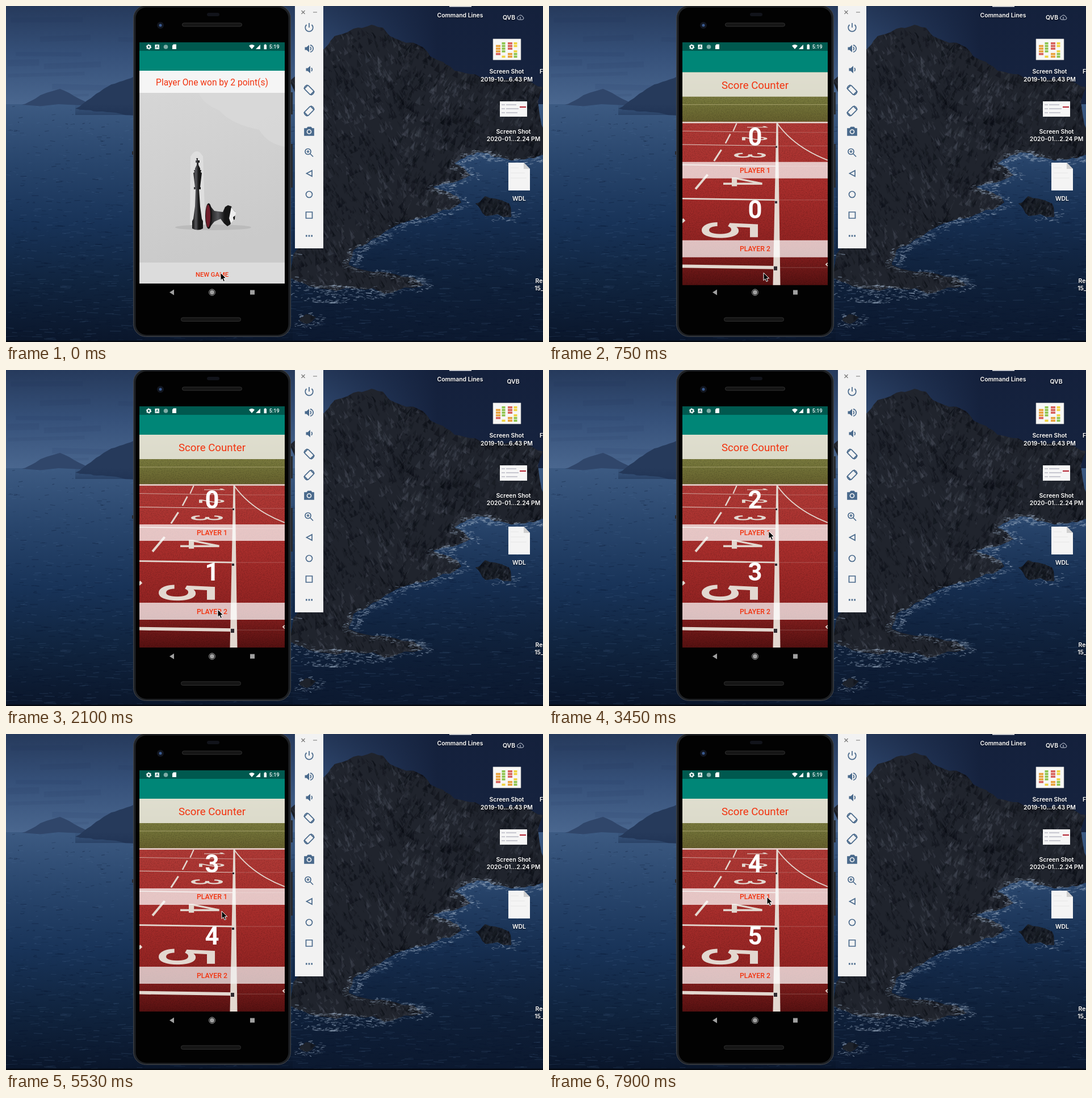
Recreate the animation shown at these times as an HTML page with a canvas. Size 946x592 px, loop 8 s.

```html
<!DOCTYPE html>
<html lang="en">
<head>
<meta charset="utf-8">
<title>Score counter</title>
<style>
html, body { margin: 0; width: 100%; height: 100%; overflow: hidden; background: #0b1a33; }
canvas, svg { position: absolute; left: 0; top: 0; width: 946px; height: 592px; }
text { text-anchor: middle; }
.app { font-family: Roboto, sans-serif; fill: #f2330f; }
.btn { font-weight: 500; font-size: 12.3px; }
.score { font-weight: 700; font-size: 43.6px; fill: #fff; }
.desk { font: 600 10.4px Inter, sans-serif; fill: #fff; filter: drop-shadow(0 1px 1px #000a); }
.chalk { fill: none; stroke: #e3d8d0; }
.lane { font: 500 10px Roboto, sans-serif; fill: #e3d8d0; stroke: none; }
</style>
</head>
<body>
<canvas id="wall" width="946" height="592"></canvas>
<svg viewBox="0 0 946 592">
<defs>
  <linearGradient id="red" x2="0" y2="1">
    <stop offset="0" stop-color="#b13b37"/><stop offset=".4" stop-color="#a92e2c"/>
    <stop offset=".75" stop-color="#922322"/><stop offset="1" stop-color="#571111"/>
  </linearGradient>
  <linearGradient id="grass" x2="0" y2="1">
    <stop offset="0" stop-color="#8f8c52"/><stop offset=".6" stop-color="#75763a"/><stop offset="1" stop-color="#66602d"/>
  </linearGradient>
  <linearGradient id="studio" x2=".25" y2="1"><stop stop-color="#d6d6d6"/><stop offset="1" stop-color="#cacaca"/></linearGradient>
  <linearGradient id="metal"><stop stop-color="#111"/><stop offset=".35" stop-color="#56565a"/><stop offset=".6" stop-color="#161616"/></linearGradient>
  <clipPath id="view"><path d="M235 64H491V492H235Z"/></clipPath>
  <clipPath id="b1"><path d="M235 272H491V301H235Z"/></clipPath>
  <clipPath id="b2"><path d="M235 410H491V440H235Z"/></clipPath>
  <filter id="grain" x="0" y="0" width="1" height="1">
    <feTurbulence type="fractalNoise" baseFrequency=".55" numOctaves="2" seed="4"/>
    <feColorMatrix values="0 0 0 0 0  0 0 0 0 0  0 0 0 0 0  0 0 0 -1.6 .95"/>
    <feComposite in2="SourceGraphic" operator="in"/>
  </filter>
</defs>

<!-- desktop icons -->
<path d="M781 0h39v1.5h-39z" fill="#eee"/>
<g id="sheet"><path d="M858 58h49v37h-49z" fill="#f7f7f5" stroke="#bbb" stroke-width=".6"/></g>
<path d="M870 168h48v27h-48z" fill="#f6f6f6"/>
<path d="M873 174h6m2 0h18M873 181h6m2 0h22M873 188h6m2 0h20" stroke="#99a"/>
<path d="M905 177h11v2h-11z" fill="#b21f2d"/>
<path d="M885 276h27l11 11v38h-38z" fill="#f4f4f4"/><path d="M912 276v11h11z" fill="#cfcfcf"/>
<path d="M889 285h14m-14 9h25m-25 9h28" stroke="#e6e6e6"/>
<g class="desk">
  <text x="800" y="20">Command Lines</text>
  <text id="folder" y="24">QVB</text>
  <text x="882" y="119">Screen Shot</text><text x="882" y="132.500">2019-10...6.43 PM</text>
  <text x="894" y="224.500">Screen Shot</text><text x="894" y="237.500">2020-01...2.24 PM</text>
  <text x="904" y="343">WDL</text>
  <text x="943" y="119">F</text><text x="939" y="488">Re</text><text x="939" y="501">15_</text>
</g>
<path id="cloud" d="M903 24h6.500a2.600 2.600 0 0 0 .5-5.100a3.800 3.800 0 0 0-7-.8a3 3 0 0 0 0 5.900zM906 19v4" fill="none" stroke="#cfd6e2"/>

<!-- emulator toolbar -->
<path d="M509 0h50v427h-50z" fill="#f2f2f2"/>
<path d="M520.500 8l6 6m0-6l-6 6M541 11h7" stroke="#777" stroke-width="1.200"/>
<g fill="none" stroke="#4a6a8c" stroke-width="1.700">
  <path d="M534 30v8M529.500 33a6.800 6.800 0 1 0 9 0"/>
  <path id="horn" d="M526.500 72.500h3l4.500-4v13l-4.500-4h-3z" fill="#4a6a8c" stroke="none"/>
  <path d="M536 72q2.500 3 0 6M536 68.800a6.300 6.300 0 0 1 0 12.400"/>
  <use href="#horn" x="2" y="37"/><path d="M538 109q2.500 3 0 6"/>
  <g id="turn" transform="translate(534 148)">
    <rect x="-4.500" y="-7.500" width="9" height="15" rx="1" transform="rotate(-45)"/>
    <path d="M-9 -2a9 9 0 0 1 6 -7M9 2a9 9 0 0 1 -6 7"/>
  </g>
  <use href="#turn" transform="matrix(-1 0 0 1 1068 37)"/>
  <path d="M526 216h4l2-2.500h5l2 2.500h3v12h-16z" fill="#4a6a8c"/><circle cx="534" cy="221.500" r="3.500" stroke="#f2f2f2"/>
  <circle cx="532" cy="256.500" r="5"/><path d="M536 260.500l5 5M529.500 256.500h5M532 254v5"/>
  <path d="M539 290v10l-9.500-5z"/><circle cx="534" cy="332" r="5.500"/><path d="M528.500 363h11v11h-11z"/>
  <path d="M528 405h13" stroke-width="2.800" stroke-dasharray="2.600 2.100"/>
</g>

<!-- phone -->
<path d="M501 152h4v39h-4zM501 243h4v77h-4zM222 256h3v6h-3z" fill="#25282d"/>
<rect x="224.500" y="-1" width="277" height="583.500" rx="22" fill="#1e2125" stroke="#43464c"/>
<rect x="228.500" y="2.500" width="269" height="577" rx="19" fill="#020202"/>
<rect x="354" y="12" width="22" height="6" rx="3" fill="#11131a"/>
<circle cx="272" cy="34" r="6" fill="#12161f"/><circle cx="272" cy="34" r="2.500" fill="#3a5a90"/>
<g fill="#151515" stroke="#303030"><rect x="310.500" y="30" width="105" height="6" rx="3"/><rect x="308.500" y="549" width="105" height="6.500" rx="3"/></g>
<g fill="#a0a0a0"><path d="M296 499.500v10l-8-5zM430 500.500h8v8h-8z"/><circle cx="363" cy="504.500" r="4"/>
<circle cx="363" cy="504.500" r="5.500" fill="none" stroke="#a0a0a0"/></g>

<g clip-path="url(#view)">
  <path d="M235 64h256v425h-256z" fill="#cfcfcf"/>
  <path d="M235 79h256v40h-256z" fill="#008677"/>

  <g id="win">
    <path d="M235 114h256v39h-256z" fill="#f5f5f5"/>
    <path d="M235 153h256v299h-256z" fill="url(#studio)"/>
    <path d="M340 153h151v95q-30-5-45-30q-50-10-70-34q-30-12-36-31z" fill="#dadada" opacity=".75"/>
    <path d="M325 265q11-18 22 0l4 126h-27z" fill="#dedede"/>
    <ellipse cx="365" cy="390" rx="67" ry="5" fill="#bbb"/>
    <g fill="url(#metal)">
      <path d="M335 268h3v4h3v4h-2v4l3 6v3h2l-1 4 2 1-3 25h1v4h-3l2 30 3 22 2 4v13q-9 5-19 0v-13l2-4 3-22 1-30h-3v-4h2l-3-25 2-1-1-4h2v-3l3-6v-4h-2v-4h2z"/>
      <path d="M357 349l10 12 15 2 4-9 5-3 6 2 3 6 4 4-1 13-5 2-3 7-5 3-6-5-6-8-11 5-10 12z"/>
    </g>
    <path d="M397 354l4 6 4 4-1 5-4 3 1 5-5 6-3-9 2-10z" fill="#eee"/>
    <ellipse cx="357" cy="370" rx="6" ry="22.500" fill="#171314"/><ellipse cx="356" cy="370" rx="4" ry="20" fill="#701e2b"/>
    <path d="M235 452h256v37h-256z" fill="#dcdcdc"/>
    <text class="app" x="363" y="140" font-size="15.600">Player One won by 2 point(s)</text>
    <text class="app" x="363" y="476.500" font-size="11.200" font-weight="500">NEW GAME</text>
  </g>

  <g id="game">
    <path d="M235 114h256v88h-256z" fill="url(#grass)"/>
    <path d="M235 201h256v288h-256z" fill="url(#red)"/>
    <path d="M235 157h256v332h-256z" filter="url(#grain)" opacity=".25"/>
    <path d="M235 171h256" stroke="#a5a06c"/>
    <g class="chalk" id="track">
      <path d="M235 202.500h256" stroke-width="2.500"/>
      <path d="M402 204q30 42 89 65M491 450l-3 2.500 3 3" stroke-width="1.800"/>
      <path d="M400.500 202h3l4 287h-13z" fill="#e3d8d0" stroke="none"/>
    </g>
    <path d="M396 456h6v7h-6zM398 341h4v4h-4zM399 244h3v3h-3z" fill="#302a30"/>
    <path d="M235 114h256v43h-256z" fill="#f4f3ee" opacity=".8"/>
    <path d="M235 272h256v29h-256zM235 410h256v30h-256z" fill="#fff" fill-opacity=".72"/>
    <g clip-path="url(#b1)"><circle class="ripple"/></g><g clip-path="url(#b2)"><circle class="ripple"/></g>
    <g class="app">
      <text x="363" y="143" font-size="18.700">Score Counter</text>
      <text class="btn" x="363" y="291.300">PLAYER 1</text><text class="btn" x="363" y="429.500">PLAYER 2</text>
      <text class="score" x="363" y="243.500">0</text><text class="score" x="363" y="371">0</text>
    </g>
  </g>

  <path d="M235 64h256v15h-256z" fill="#00594f"/>
  <g fill="#fff">
    <circle cx="251.500" cy="72" r="2.800" fill="none" stroke="#fff" stroke-width="2"/>
    <circle cx="251.500" cy="72" r="4.300" fill="none" stroke="#fff" stroke-dasharray="2.200 2.300"/>
    <path d="M262.500 68h7.500v8h-7.500z"/><path d="M264.500 74.500l1.800-5 1.800 5" fill="none" stroke="#00594f"/>
    <circle cx="281.500" cy="72" r="3.800" fill="#7fada7"/>
    <path d="M295 67.500h5v8.500h-7v-6.500z"/>
    <path d="M428 70q5-4 10 0l-5 6zM448 68v8h-8zM454.500 68.500h1v-1h2.500v1h1v7.800h-4.500z"/>
    <text x="472.700" y="75.200" font-family="Roboto, sans-serif" font-size="9" font-weight="500">5:19</text>
  </g>
</g>
<path id="cursor" d="M0 0v13.500l3-2.800 2 4.800 2.500-1-2-4.700h4.300z" stroke="#fff" stroke-linejoin="round"/>
</svg>

<script>
const $ = s => document.querySelector(s), all = s => [...document.querySelectorAll(s)];
const ctx = $('#wall').getContext('2d');
let seed = 11;
const rnd = (a = 1, b = 0) => {
  seed = (seed * 1664525 + 1013904223) % 4294967296;
  return b + (a - b) * seed / 4294967296;
};

// Wallpaper: a night coast grown from a few key points.
const blend = (x, y, w, h, ...stops) => {
  const g = ctx.createLinearGradient(0, y, 0, y + h);
  stops.forEach((c, i) => g.addColorStop(i / (stops.length - 1), c));
  ctx.fillStyle = g;
  ctx.fillRect(x, y, w, h);
};
const polygon = (pts, fill) => {
  const p = new Path2D('M' + pts.join('L') + 'Z');
  ctx.fillStyle = fill;
  ctx.fill(p);
  return p;
};
const streak = (x, y, dx, dy, w, color) => {
  ctx.strokeStyle = color;
  ctx.lineWidth = w;
  ctx.beginPath();
  ctx.moveTo(x, y);
  ctx.lineTo(x + dx, y + dy);
  ctx.stroke();
};
// Splits every edge with a random shift, so few points give a rocky outline.
const rough = (text, depth = 3, amp = .12) => {
  let pts = text.split(' ').map(p => p.split(',').map(Number));
  while (depth--) pts = pts.flatMap((p, i) => {
    const q = pts[(i + 1) % pts.length], size = Math.hypot(q[0] - p[0], q[1] - p[1]) * amp;
    return [p, [(p[0] + q[0]) / 2 + rnd(size, -size), (p[1] + q[1]) / 2 + rnd(size, -size)]];
  });
  return pts;
};
const surf = (pts, top, density) => pts.filter(p => p[1] > top && p[0] < 940).forEach(([x, y]) => {
  for (let i = 0; i < density; i++)
    streak(x + rnd(14, -12), y + rnd(9, -3), rnd(8, 2), rnd(2, -2), rnd(1.7, .5), `rgba(150,168,190,${rnd(.65, .1)})`);
});
const facets = (land, x0, x1, y0, y1, n) => {
  ctx.save();
  ctx.clip(land);
  for (let i = 0; i < n; i++) {
    const x = rnd(x1, x0), y = rnd(y1, y0), s = rnd(13, 3), lean = x > 700 ? -1 : .5;
    const ridge = Math.sin(x * .045 + y * .03) + Math.sin(x * .021 - y * .06) + rnd(2, -2) - (y > 230 && x < 680 ? .7 : 0);
    const fill = ridge > .5 ? `rgba(92,98,112,${rnd(.3, .08)})` : `rgba(5,8,15,${rnd(.42, .1)})`;
    polygon([[x, y], [x + lean * s + rnd(4), y + s], [x + lean * s * .5 + rnd(7, -3), y + s * 1.4]], fill);
  }
  ctx.restore();
};
function paintWall() {
  blend(0, 0, 946, 175, '#263a5c', '#36517a', '#4a678f');
  const dusk = ctx.createLinearGradient(520, 0, 760, 0);
  dusk.addColorStop(0, '#131f3a00');
  dusk.addColorStop(1, '#131f3af0');
  ctx.fillStyle = dusk;
  ctx.fillRect(520, 0, 426, 180);
  for (let i = 0; i < 14; i++) streak(rnd(440, -60), rnd(160, 20), rnd(160, 50), rnd(4, -4), rnd(12, 4), '#16284612');
  blend(0, 173, 946, 419, '#3c5a82', '#28456c', '#183358', '#10243f', '#0a162b');
  blend(505, 250, 441, 342, '#0d1b3300', '#0d1b33a0');
  for (let i = 0; i < 3000; i++) {
    const y = 176 + 414 * rnd() ** .8;
    streak(rnd(946), y, rnd(5, 1) * y / 130, rnd(1.5, -1.500), rnd(1.500, .4), rnd() < .55 ? '#06122a48' : '#5a7da62c');
  }
  const haze = '#30466a';
  polygon(rough('28,174 52,163 95,146 130,164 152,175', 2, .06), haze);
  polygon(rough('122,181 172,146 226,124 226,193 160,186', 3, .06), '#263a5b');
  blend(122, 172, 104, 20, '#1c2f5000', '#1c2f5080');

  const coast = rough('500,132 560,76 612,40 664,38 735,73 790,114 862,128 946,143 946,262 868,266 830,258 790,278 818,298 752,318 802,346 722,374 662,402 612,430 604,456 716,478 736,492 622,498 500,478');
  const land = polygon(coast, '#20242d');
  facets(land, 500, 946, 36, 500, 4200);
  surf(coast, 250, 9);
  for (const [outline, n] of [['827,348 844,335 886,348 890,372 845,370', 130], ['516,553 528,543 546,548 530,560', 30]]) {
    const edge = rough(outline, 2);
    surf(edge, 358, 5);
    facets(polygon(edge, '#1d222b'), edge[0][0], edge[0][0] + 65, 335, 562, n * 6);
  }
  for (let i = 0; i < 170; i++) {
    const a = rnd(6.3);
    streak(575 + 85 * Math.cos(a) * rnd(), 508 + 15 * Math.sin(a), rnd(9, 2), rnd(2, -2), 1.2, `rgba(150,168,190,${rnd(.6, .1)})`);
  }
  blend(0, 589.5, 946, 3, '#050a14', '#04070e');
}
paintWall();

const cellColors = ['#e9a13b', '#8cc34b', '#d7605a', '#f0d23c'];
let cells = '';
for (let c = 0; c < 4; c++) for (let r = 0; r < 6; r++)
  if ((c + r) % 5) cells += `<rect x="${863 + c * 10.5}" y="${64 + r * 4.7}" width="${c % 2 ? 6 : 8}" height="3.600" fill="${cellColors[(c + (r > 3) * 2) % 4]}"/>`;
$('#sheet').innerHTML += cells;

// Lanes recede towards a horizon at y = 100; depth() is the distance below it.
const depth = n => 1 / (.0098 - .0014 * n);
let lanes = '';
for (let n = 1; n <= 5; n++) {
  const line = depth(n), y = 100 + line, d = depth(n - .45), dx = d * d * 2.5e-4, dy = d * .062;
  lanes += `<path d="M235 ${y - 1.500}L402 ${y + 1}" stroke-width="${line * line * 4.600e-5}"/>
    <path d="M402 ${y + 1}H491" opacity=".25"/>
    <path d="M${328 - .61 * (d - 110) + dx} ${100 + d - dy}l${-2 * dx} ${2 * dy}" stroke-width="${d * .019}"/>
    <text class="lane" y="3.550" transform="translate(${367 - .268 * (d - 111)} ${100 + d}) scale(${d * .047} ${d * d * 7e-5}) rotate(90)">${n}</text>`;
}
$('#track').innerHTML += lanes;

// Pointer stops: arrival time, x, y. Each trip takes at most 600 ms.
const stops = [
  [0, 378, 470], [1800, 373, 422], [3150, 387, 284], [4800, 371, 425],
  [5550, 380, 312], [5850, 379, 281], [6900, 361, 425], [7950, 384, 287]
];
const clicks = [[3150, 3450, 3750, 6120], [2100, 2400, 2700, 4950, 7150]];
const cloudFlips = [1650, 2400, 2850, 3750];
const scores = all('.score'), ripples = all('.ripple');
const show = (el, on) => el.style.display = on ? '' : 'none';
const ease = k => k * k * (3 - 2 * k);

function pointer(t) {
  const beat = Math.floor((t + 50) / 150) * 150;
  const i = stops.findIndex(s => s[0] > beat);
  if (i < 0) return stops[stops.length - 1].slice(1);
  const [from, to] = [stops[Math.max(0, i - 1)], stops[i]];
  const trip = Math.min(600, to[0] - from[0]);
  const k = ease(Math.max(0, 1 - (to[0] - beat) / trip));
  return [1, 2].map(j => from[j] + (to[j] - from[j]) * k);
}

function draw(t) {
  $('#cursor').setAttribute('transform', `translate(${pointer(t)})`);
  show($('#win'), t < 750);
  show($('#game'), t >= 750);
  $('#game').setAttribute('transform', `translate(0 ${t < 900 ? 2.7 : 0})`);

  const hidden = cloudFlips.filter(f => f <= t).length % 2;
  show($('#cloud'), !hidden);
  $('#folder').setAttribute('x', hidden ? 893.5 : 886);

  clicks.forEach((times, i) => {
    const done = times.filter(c => c <= t);
    scores[i].textContent = done.length;
    const at = done.length ? done[done.length - 1] : -Infinity;
    const age = Math.floor((t - at) / 150), on = age > 0 && age < 4;
    show(ripples[i], on);
    if (!on) return;
    const [cx, cy] = pointer(at);
    const set = { cx, cy, r: 50 * age, opacity: .11 - .025 * age };
    for (const k in set) ripples[i].setAttribute(k, set[k]);
  });
}
const start = performance.now();
const tick = now => {
  draw(Math.max(0, now - start) % 8000);
  requestAnimationFrame(tick);
};
draw(0);
requestAnimationFrame(tick);
</script>
</body>
</html>
```
